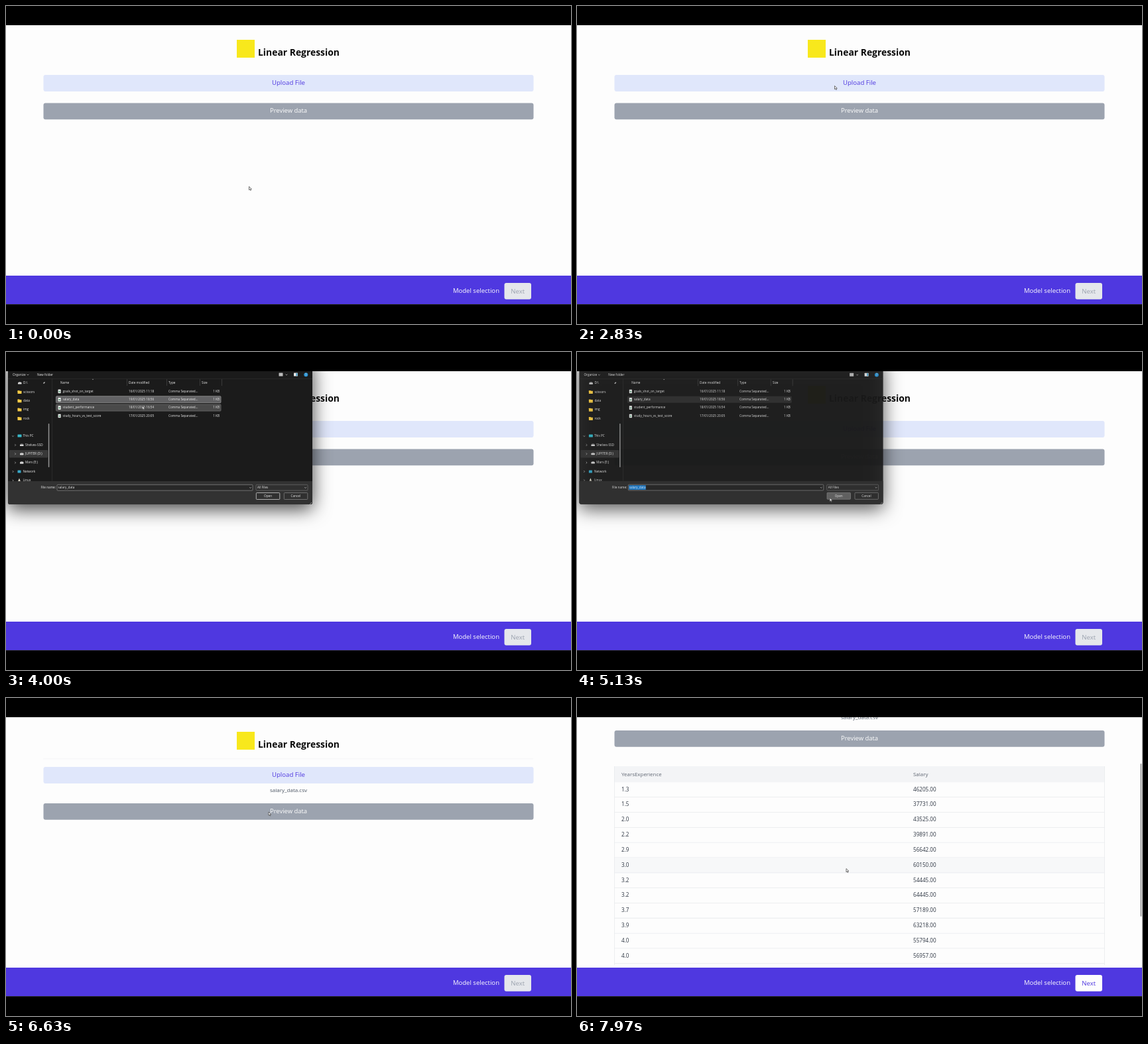
An HTML page with a canvas that plays this animation: 852x480 px, repeating every 8 s.

```html
<!DOCTYPE html>
<html lang="en">
<head>
<meta charset="utf-8">
<title>Linear Regression</title>
<style>
html, body { margin: 0; width: 100%; height: 100%; overflow: hidden; background: #000; }
canvas { display: block; }
</style>
</head>
<body>
<canvas id="stage" width="852" height="480"></canvas>
<script>
const ctx = document.getElementById('stage').getContext('2d');
const LOOP = 8000;
const TIME = { open: 2960, pick: 3720, confirm: 4880, close: 5120, loaded: 5300, preview: 6480, table: 6640, scroll: 7560 };
const INDIGO = '#4f38e0', GRAY = '#9ca3af', PAGE = '#fdfdfd';

const TABLE = [
  ['1.3', 46205], ['1.5', 37731], ['2.0', 43525], ['2.2', 39891],
  ['2.9', 56642], ['3.0', 60150], ['3.2', 54445], ['3.2', 64445],
  ['3.7', 57189], ['3.9', 63218], ['4.0', 55794], ['4.0', 56957]
];
const FILES = [
  ['goals_shot_on_target', '16/01/2025 11:18'], ['salary_data', '19/01/2025 18:56'],
  ['student_performance', '18/01/2025 16:54'], ['study_hours_vs_test_score', '17/01/2025 20:05']
];
// Pointer tip: time, x, y
const POINTER = [
  [0, 366.5, 272.5], [200, 366.5, 272.5], [1950, 388.5, 120.5], [3200, 388.5, 120.5],
  [3620, 150, 71], [3780, 150, 71], [4000, 205.5, 81.5], [4750, 381, 220.5],
  [5730, 381.5, 220], [6150, 396, 172], [6650, 396, 172], [7200, 405.5, 257.5], [LOOP, 406, 257.5]
];

const clamp = v => Math.max(0, Math.min(1, v));
const ease = p => p < .5 ? 2 * p * p : 1 - 2 * (1 - p) ** 2;
const progress = (t, start, length) => clamp((t - start) / length);

function pointerAt(t) {
  const i = Math.max(1, POINTER.findIndex(k => k[0] > t));
  const [t0, x0, y0] = POINTER[i - 1], [t1, x1, y1] = POINTER[i];
  const p = ease((t - t0) / (t1 - t0));
  return { x: x0 + (x1 - x0) * p, y: y0 + (y1 - y0) * p };
}

function box(x, y, w, h, fill, radius = 0, stroke) {
  ctx.beginPath();
  ctx.roundRect(x, y, w, h, radius);
  if (fill) { ctx.fillStyle = fill; ctx.fill(); }
  if (stroke) { ctx.strokeStyle = stroke; ctx.lineWidth = .8; ctx.stroke(); }
}

function shape(fill, ...points) {
  ctx.beginPath();
  points.forEach(([x, y]) => ctx.lineTo(x, y));
  ctx.closePath();
  ctx.fillStyle = fill;
  ctx.fill();
}

function text(str, x, y, size, color, align = 'left', weight = 400) {
  ctx.font = `${weight} ${size}px "Open Sans", "Noto Sans", sans-serif`;
  ctx.textAlign = align;
  ctx.textBaseline = 'middle';
  ctx.fillStyle = color;
  ctx.fillText(str, x, y);
}

function clipped(x, y, w, h, draw) {
  ctx.save();
  ctx.beginPath();
  ctx.rect(x, y, w, h);
  ctx.clip();
  draw();
  ctx.restore();
}

function drawTable(pointer, scroll) {
  const top = 213, first = 237.2, step = 22.83, line = '#e8eaed';
  box(56, top, 739.5, first - top, '#f3f4f6');
  text('YearsExperience', 67, 225.5, 7.95, '#5f6672');
  text('Salary', 507, 225.5, 7.95, '#5f6672');
  const hover = Math.floor((pointer.y + scroll - first) / step);
  TABLE.forEach(([years, salary], i) => {
    const y = first + i * step;
    if (i === hover) box(56, y, 739.5, step, '#f7f8f9');
    box(56, y + step - .8, 739.5, .8, line);
    text(years, 67, y + 11.2, 8.1, '#2b3340');
    text(salary.toFixed(2), 507, y + 11.2, 8.1, '#2b3340');
  });
  box(56, top, .8, 300, line);
  box(795, top, .8, 300, line);
}

function drawPage(t, pointer, scroll) {
  const loaded = t >= TIME.loaded, previewed = t >= TIME.preview;
  box(0, 29, 852, 378, PAGE);
  ctx.save();
  ctx.translate(0, -scroll);
  box(348, 51, 27, 27, '#f8e81c');
  text('Linear Regression', 380, 71.7, 13.9, '#0a0a0a', 'left', 700);
  if (loaded) box(56, 91.5, 739, .8, '#f3f4f6');
  box(56.5, 104, 739, 25, '#e0e7fb', 3);
  text('Upload File', 426, 116.4, 9.6, INDIGO, 'center');
  const y = loaded ? 159 : 146.5;
  if (loaded) text('salary_data.csv', 426, 140.4, 8, '#4b5563', 'center');
  const active = loaded && !previewed;
  const hovered = active && pointer.y > y && pointer.y < y + 25;
  box(56.5, y, 739, 24.7, active ? (hovered ? '#4632c8' : INDIGO) : GRAY, 3);
  text('Preview data', 426, y + 12.5, 9.45, '#fdfdfd', 'center');
  if (t >= TIME.table) drawTable(pointer, scroll);
  ctx.restore();
  if (t >= TIME.table) box(849.6, 34 + scroll * .59, 1.6, 231, '#929292', 1);
}

function drawFooter(t) {
  const ready = t >= TIME.table;
  box(0, 407, 852, 43, INDIGO);
  box(0, 450, 852, 1, '#262626');
  text('Model selection', 744, 431, 9.55, '#fdfdfd', 'right');
  box(751.5, 418, 40.5, 24.7, ready ? '#fdfdfd' : '#e5e7eb', 3);
  text('Next', 771.7, 431, 9.6, ready ? INDIGO : GRAY, 'center');
}

function folder(x, y) {
  box(x, y - 2.5, 3, 2, '#e0ac20', .5);
  box(x, y - 1.8, 6, 4.3, '#f6cc48', .5);
}

function drive(x, y) {
  box(x, y - 1, 5.5, 2.6, '#d6d6d6', .6);
  box(x + 1, y - 2, 3.5, 1, '#8c8c8c');
}

function chevron(x, y, down) {
  ctx.beginPath();
  if (down) { ctx.moveTo(x - 1.4, y - .7); ctx.lineTo(x, y + .7); ctx.lineTo(x + 1.4, y - .7); }
  else { ctx.moveTo(x - .7, y - 1.4); ctx.lineTo(x + .7, y); ctx.lineTo(x - .7, y + 1.4); }
  ctx.strokeStyle = '#c4c4c4';
  ctx.lineWidth = .7;
  ctx.stroke();
}

function drawSidebar(label) {
  drive(18, 47);
  label('D:\\', 26, 47);
  shape('#c4c4c4', [56, 47], [58, 45], [59, 46], [57, 48]);
  ['scissors', 'data', 'img', 'rock'].forEach((name, i) => {
    const y = 60.5 + i * 13.3;
    folder(17.5, y);
    label(name, 26, y);
  });
  box(5, 148, 58, 11.5, '#383838', 1);
  chevron(10.5, 127, true);
  box(17.5, 124.5, 6, 4, '#38b8c8', .5);
  label('This PC', 25.5, 127);
  ['Shelves-SSD', 'JUPITER (D:)', 'Mars (E:)'].forEach((name, i) => {
    const y = 140.5 + i * 13.3;
    chevron(14, y);
    drive(21, y);
    label(name, 29, y);
  });
  chevron(10.5, 180.5);
  box(17.5, 178.5, 5, 4, '#38a8c8', .5);
  label('Network', 25.5, 180.5);
  chevron(10.5, 194);
  shape('#e4e0d0', [18, 195.5], [20, 190.5], [22, 195.5]);
  label('Linux', 25.5, 194);
  box(63.8, 108, 1.5, 66, '#959595', .7);
}

function drawFiles(t, label, pointer) {
  [['Name', 82], ['Date modified', 185], ['Type', 245], ['Size', 295]].forEach(([name, x]) => label(name, x, 46.3));
  [182, 242, 292, 325].forEach(x => box(x, 41, .6, 10, '#505050'));
  shape('#a0a0a0', [129.8, 41.8], [131, 40.6], [132.2, 41.8]);
  FILES.forEach(([name, date], i) => {
    const y = 59.4 + i * 12.35;
    const hover = pointer.x > 75 && pointer.x < 324 && Math.abs(pointer.y - y) < 6.1;
    const selected = i === 1 && t >= TIME.pick;
    const focused = selected && t < TIME.confirm;
    if (selected || hover) box(75.5, y - 5, 248.5, 10, focused ? '#626264' : selected ? '#333333' : '#4a4a4a', 1, focused ? '#929294' : hover && '#6a6a6a');
    box(78.5, y - 2.8, 4.2, 5.6, '#ececec', .4);
    box(79.5, y - .7, 2.2, 2, '#5d9c78');
    label(name, 85.5, y);
    label(date, 185, y);
    label('Comma Separated...', 245, y);
    label('1 KB', 322, y, 'right');
  });
}

function drawDialogControls(t, label, pointer) {
  box(3, 195, 459, 35, '#323232', [0, 0, 3, 3]);
  label('File name:', 75, 204.8, 'right');
  box(77, 200.3, 295, 8.8, '#282828', 1, '#828282');
  if (t >= TIME.pick) {
    if (t >= TIME.confirm) box(78, 201.3, 25.5, 6.8, '#1f80d0');
    label('salary_data', 78.5, 204.8);
  }
  chevron(368.5, 204.8, true);
  box(377, 200.3, 78, 8.8, '#303030', 1, '#686868');
  label('All Files', 379, 204.8);
  chevron(451.5, 204.8, true);
  const hover = pointer.x > 377 && pointer.x < 413 && pointer.y > 212 && pointer.y < 223;
  box(377.3, 212.5, 35.5, 10, hover ? '#666666' : '#303030', 1, hover ? '#808080' : '#d0d0d0');
  label('Open', 395, 217.5, 'center');
  box(419.3, 212.5, 35.5, 10, '#303030', 1, '#808080');
  label('Cancel', 436.8, 217.5, 'center');
  for (let i = 0; i < 3; i++) box(460 - i, 227 + i, 1, 1, '#909090');
}

function drawDialog(t, pointer) {
  const shown = ease(progress(t, TIME.open, 150));
  const leaving = progress(t, TIME.close, 120);
  const alpha = shown * (1 - leaving);
  if (!alpha) return;
  const scale = 1 - .06 * (1 - shown) - .02 * leaving;
  const label = (str, x, y, align) => text(str, x, y, 4.72, '#eaeaea', align);
  ctx.save();
  ctx.globalAlpha = alpha;
  ctx.translate(232 * (1 - scale), 120 * (1 - scale));
  ctx.scale(scale, scale);
  ctx.shadowColor = 'rgba(0, 0, 0, .75)';
  ctx.shadowBlur = 28;
  ctx.shadowOffsetY = 7;
  box(3, 10, 459, 220, '#1b1b1b', 3);
  ctx.shadowColor = 'transparent';
  label('Organize', 10, 34.3);
  chevron(33, 34.3, true);
  label('New folder', 47, 34.3);
  box(411.5, 31.5, 6, 5, '#bcbcbc', .5);
  chevron(423, 34.3, true);
  box(434, 31.5, 6, 5, '#e8e8e8', .5);
  box(437.5, 32, 2, 4, '#3895c0');
  box(449.3, 31.3, 6, 6, '#2c94d4', 3);
  label('?', 452.3, 34.3, 'center');
  box(3, 40, 459, .5, '#363636');
  box(69, 40, .6, 155, '#363636');
  clipped(3, 40, 459, 155, () => {
    drawSidebar(label);
    drawFiles(t, label, pointer);
  });
  drawDialogControls(t, label, pointer);
  ctx.restore();
}

function drawPointer({ x, y }) {
  ctx.lineWidth = .8;
  ctx.lineJoin = 'round';
  ctx.strokeStyle = '#505050';
  shape('#fff', [x, y], [x, y + 5.2], [x + 1.3, y + 4.1], [x + 2.2, y + 6], [x + 3, y + 5.6], [x + 2.2, y + 3.8], [x + 3.8, y + 3.7]);
  ctx.stroke();
}

function render(t) {
  const pointer = pointerAt(t);
  const scroll = 110 * ease(progress(t, TIME.scroll, 410));
  box(0, 0, 852, 480, '#000');
  clipped(0, 29, 852, 378, () => drawPage(t, pointer, scroll));
  drawFooter(t);
  clipped(0, 29, 852, 421, () => drawDialog(t, pointer));
  drawPointer(pointer);
}

const start = performance.now();
function frame() {
  render((performance.now() - start) % LOOP);
  requestAnimationFrame(frame);
}
frame();
</script>
</body>
</html>
```
